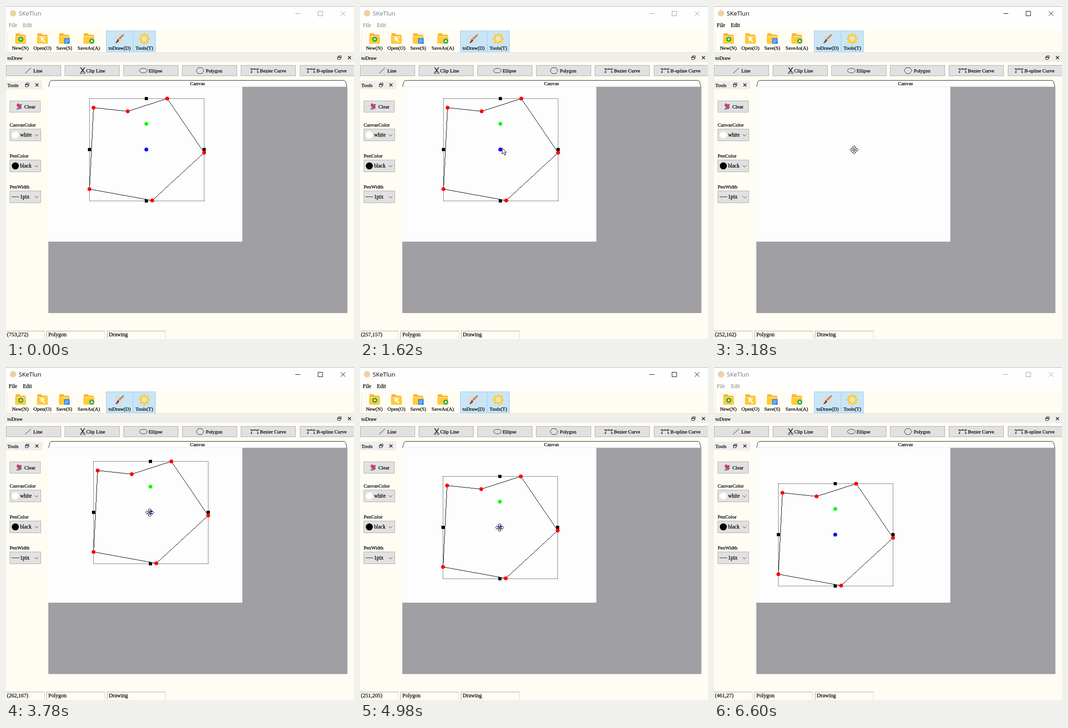
An HTML page with a canvas that plays this animation: 765x732 px, repeating every 6780 ms.

```html
<!DOCTYPE html>
<html lang="en">
<head>
<meta charset="utf-8">
<title>Polygon drag</title>
<style>
html, body { margin: 0; width: 765px; height: 732px; overflow: hidden; }
canvas { display: block; }
</style>
</head>
<body>
<canvas id="stage" width="765" height="732"></canvas>
<script>
const ctx = document.getElementById('stage').getContext('2d');
const LOOP = 6780, STEP = 60, SCALE = 0.853;
const SERIF = '"Liberation Serif", serif';

// Pointer path: time, then canvas coordinates as shown in the status bar
const path = [
  [240, 770, -199], [600, 342, 64], [900, 342, 64], [1620, 257, 157],
  [2160, 252, 161], [2460, 252, 161], [2520, 252, 162], [3480, 252, 162],
  [3780, 262, 167], [4200, 273, 183], [4380, 284, 197], [4620, 291, 205],
  [4740, 291, 205], [4980, 251, 205], [5460, 203, 224], [5820, 203, 224],
  [6000, 461, 27], [6120, 776, -164]
];
const corners = [[192, 223], [267, 231], [354, 203], [435, 322], [321, 427], [183, 402]];
const frame = [[183, 203], [435, 203], [435, 428], [183, 428]];
const handles = [[308, 203], [183, 315], [435, 315], [308, 428]];

const clamp = (v, a, b) => Math.max(a, Math.min(b, v));

function pointer(t) {
  t = clamp(t, path[0][0], path[path.length - 1][0]);
  const i = Math.max(1, path.findIndex(k => k[0] >= t));
  const [a, b] = [path[i - 1], path[i]];
  const f = (t - a[0]) / (b[0] - a[0]);
  return [1, 2].map(n => Math.round(a[n] + (b[n] - a[n]) * f));
}

function box(x, y, w, h, fill, edge) {
  ctx.fillStyle = edge || fill;
  ctx.fillRect(x, y, w, h);
  if (edge) {
    ctx.fillStyle = fill;
    ctx.fillRect(x + 1, y + 1, w - 2, h - 2);
  }
}

function text(s, x, y, size = 11.3, align = 'left', color = '#000', family = SERIF) {
  ctx.font = `${size}px ${family}`;
  ctx.textAlign = align;
  ctx.fillStyle = ctx.strokeStyle = color;
  ctx.fillText(s, x, y);
  if (family === SERIF) {
    ctx.lineWidth = 0.25;
    ctx.strokeText(s, x, y);
  }
}

function shape(d, fill, stroke, width = 1) {
  const p = new Path2D(d);
  if (fill) { ctx.fillStyle = fill; ctx.fill(p); }
  if (stroke) { ctx.strokeStyle = stroke; ctx.lineWidth = width; ctx.stroke(p); }
}

function dot(x, y, r, fill, edge, ry = r) {
  ctx.beginPath();
  ctx.ellipse(x, y, r, ry, 0, 0, 7);
  if (fill) { ctx.fillStyle = fill; ctx.fill(); }
  if (edge) { ctx.strokeStyle = edge; ctx.lineWidth = 1; ctx.stroke(); }
}

// Closed outline of whole pixels, without smoothing
function pixelLoop(points, gap) {
  ctx.fillStyle = '#000';
  points.forEach(([x, y], i) => {
    const [nx, ny] = points[(i + 1) % points.length];
    const n = Math.max(Math.abs(nx - x), Math.abs(ny - y));
    for (let k = 0; k < n; k += gap) {
      ctx.fillRect(Math.round(x + (nx - x) * k / n), Math.round(y + (ny - y) * k / n), 1, 1);
    }
  });
}

function placed(x, y, angle, draw) {
  ctx.save();
  ctx.translate(x, y);
  ctx.rotate(angle);
  draw();
  ctx.restore();
}

const cross = (x, y, r, color, width = 1) =>
  shape(`M${x - r} ${y - r}l${2 * r} ${2 * r}m0 ${-2 * r}l${-2 * r} ${2 * r}`, null, color, width);

function titleBar(t) {
  const active = t >= 3180 && t < 6540;
  const ink = active ? '#000' : '#999';
  let mark = ink;
  box(0, 0, 765, 31, '#fefefe');
  box(0, 31, 765, 22, '#fffefb');
  box(0, 0, 765, 1, '#a8a8a8');
  if (t === 240 || t === 300) {
    box(719, 1, 46, 29, t === 240 ? '#e81123' : '#f4a0a7');
    mark = '#fff';
  }
  dot(15.5, 16, 7, '#f0cfa4');
  text('SKeTlun', 28, 21, 13.2, 'left', active ? '#000' : '#777', '"Open Sans", sans-serif');
  shape('M636 16.5h11M686 11.5h10v10h-10z', null, ink);
  cross(741, 16.5, 5, mark);
  text('File', 6, 46, 12, 'left', ink);
  text('Edit', 37, 46, 12, 'left', ink);
}

function folder(x) {
  placed(x, 59, 0, () => {
    shape('M1 1H10L12 4H21Q23 4 23 6V22H1Z', '#ffb52b');
    shape('M3 7H21V12H3Z', '#ffe28a');
    shape('M0 9H24V21Q24 24 21 24H3Q0 24 0 21Z', '#ffcb3a');
  });
}

function toolBar() {
  ctx.fillStyle = '#b8b5ae';
  for (let y = 57; y < 100; y += 3) ctx.fillRect(3, y, 1, 1);
  box(220, 54, 60, 47, '#c9e5f6', '#94cdf5');
  box(279, 54, 50, 47, '#c9e5f6', '#94cdf5');
  folder(20);
  dot(32.5, 73, 5.5, '#24a83b');
  shape('M29.5 73h6M32.5 70v6', null, '#fff', 1.5);
  folder(68);
  shape('M76 67l10 4-4 2 4 5-2 2-4-5-3 3z', '#fff');
  folder(116);
  box(128, 71, 12, 12, '#2b83ea');
  shape('M130 74.5h8M130 77.5h8M130 80.5h5', null, '#fff');
  folder(170);
  dot(188.5, 77, 5.5, '#2bab46');
  shape('M188.5 73.5l3 5.5h-6z', '#fff');

  dot(248, 73, 10, '#dddcd8');
  shape('M259 62Q260 63 258 66L250 74 247 71 256 63Q258 61 259 62Z', '#c0855f');
  shape('M246 72l3 3Q247 81 240 82 243 78 246 72Z', '#6b4c3c');
  placed(304, 72, 0, () => {
    for (let i = 0; i < 8; i++) {
      ctx.rotate(Math.PI / 4);
      box(-2.5, -12, 5, 6, '#fccb3c');
    }
    dot(0, 0, 9, '#fdd04a');
    dot(0, 0, 5.5, '#fbe7a2');
    dot(0, 0, 4, '#d5e6ec');
  });
  [['New(N)', 31.5], ['Open(O)', 80], ['Save(S)', 128], ['SaveAs(A)', 182], ['toDraw(D)', 249.5], ['Tools(T)', 304]]
    .forEach(([s, x]) => text(s, x, 96, 11.1, 'center'));
}

function dockTitle(s, x, y, w, h, icons) {
  box(x, y, w, h, '#efeeea');
  text(s, 3, y + 14, 11.2);
  const [a, b] = icons, m = y + 9.5;
  shape(`M${a - 3.5} ${m - 1}h6v5h-6zM${a - 1.5} ${m - 1}v-3h6v5h-2`, null, '#222');
  shape(`M${a - 4} ${m - 1}h7`, null, '#222', 2);
  cross(b, m, 3.3, '#222', 1.6);
}

function curveIcon(x) {
  shape(`M${x} 146Q${x} 138 ${x + 7} 138.5Q${x + 14} 138 ${x + 14} 146M${x - 1} 138.5h16`, null, '#333');
  for (const [dx, y] of [[-2, 137], [5.5, 137], [13, 137], [-1.5, 144], [12.5, 144]]) {
    box(x + dx, y, 3, 3, '#fff', '#333');
  }
}

function drawBar() {
  box(0, 102, 765, 1, '#d2d0ca');
  dockTitle('toDraw', 0, 104, 765, 19, [732.5, 755]);
  const labels = [['Line', 70], ['Clip Line', 197], ['Ellipse', 328.5], ['Polygon', 457.5], ['Bezier Curve', 587], ['B-spline Curve', 715.5]];
  labels.forEach(([s, x], i) => {
    box(Math.round(i * 129.1), 130, 121, 24, '#e1e1e1', '#adadad');
    text(s, x, 146, 10.9, 'center');
  });
  shape('M42 148L55 136', null, '#222');
  shape('M164 135l7 10M173 135l-7 10', null, '#222', 1.8);
  dot(165, 147, 2, null, '#222');
  dot(172, 147, 2, null, '#222');
  dot(302, 142, 8.5, null, '#333', 5);
  shape('M422.5 135.5h8l4.5 6.5-4.5 6.5h-8l-4.5-6.5z', null, '#333');
  curveIcon(539.5);
  curveIcon(663.5);
}

function sidePanel() {
  dockTitle('Tools', 0, 164, 80, 19, [46, 68]);
  box(8, 208, 68, 26, '#e1e1e1', '#adadad');
  shape('M25 214l4 1 6 8-4 4-8-8z', '#e7354d');
  shape('M29 218l4-3 2 2-3 4z', '#4865c8');
  shape('M22 227l5-5 4 4-4 2z', '#5a8be0');
  text('Clear', 52.5, 225, 11.4, 'center');
  [['CanvasColor', 'white'], ['PenColor', 'black'], ['PenWidth', '1pix']].forEach(([label, value], i) => {
    const y = 270 + i * 68;
    text(label, 8, y - 5, 11);
    box(8, y, 69, 27, '#e1e1e1', '#adadad');
    if (i < 2) dot(20.5, y + 13.5, 7.8, i ? '#000' : '#fff');
    else box(12, y + 13, 17, 1, '#222');
    text(value, 31, y + 17, 11.5);
    shape(`M63 ${y + 12}l4 4 4-4`, null, '#444');
  });
}

function canvasArea() {
  shape('M93.5 178L96 168Q97.5 163.5 102 163.5H742Q746 163.5 747 168L749.5 178', '#fefefe', '#222');
  text('Canvas', 421, 174, 11.2, 'center');
  box(93, 177.5, 657.5, 497.5, '#a09fa4');
  box(93, 177.5, 426.5, 340.5, '#fdfdfd');
}

function polygon(t) {
  if (t === 3180) return;
  const [x, y] = pointer(clamp(t, 3480, 5460));
  placed(Math.round((x - 252) * SCALE), Math.round((y - 162) * SCALE), 0, () => {
    pixelLoop(frame, 2);
    pixelLoop(corners, 1);
    for (const [cx, cy] of handles) box(cx - 3, cy - 3, 7, 7, '#000');
    for (const [cx, cy] of corners) dot(cx + 0.5, cy + 0.5, 4.3, '#f00');
    dot(308.5, 259, 4.3, '#0f0');
    dot(308.5, 315.5, 4.3, '#00f');
  });
}

function statusBar(t) {
  const [x, y] = pointer(Math.min(t, 6000));
  const place = t < 240 || y < 0 ? '753,272' : `${x},${y}`;
  [[`(${place})`, -1, 86], ['Polygon', 89, 129], ['Drawing', 222, 129]].forEach(([s, left, w], i) => {
    box(left, 714, w, 1, '#a5a4a0');
    box(left, 714, 1, 17, '#a5a4a0');
    box(left + w - 1, 714, 1, 17, '#d6d4ce');
    text(s, i ? left + 4 : 2, 726, 12);
  });
}

function cursor(t) {
  if (t < 240 || t >= 6180) return;
  const [x, y] = pointer(t);
  placed(Math.round(93 + x * SCALE), Math.round(178 + y * SCALE), 0, () => {
    if (t < 1680 || t >= 5580) {
      shape('M.5 .5V13.5L3.5 10.7 6 16 8.4 15 6 9.7H10Z', '#fff', '#000');
      return;
    }
    let d = '';
    for (let i = 0; i < 4; i++) {
      const c = [1, 0, -1, 0][i], s = [0, 1, 0, -1][i];
      for (const [px, py] of [[-1.5, -1.5], [-1.5, -5.5], [-4, -5.5], [0, -9.3], [4, -5.5], [1.5, -5.5]]) {
        d += `${d ? 'L' : 'M'}${px * c - py * s} ${px * s + py * c}`;
      }
    }
    shape(d + 'Z', '#fff', '#111');
    // The centre dot shows through the shaft while dragging
    const dragging = t >= 3240;
    box(-1, -1, 2, 2, dragging ? '#00f' : '#111');
    if (dragging) shape('M-3.5 0h7M0 -3.5v7', null, '#22c');
  });
}

function render(now) {
  const t = Math.floor(now % LOOP / STEP) * STEP;
  box(0, 0, 765, 732, '#fffcf3');
  titleBar(t);
  toolBar();
  drawBar();
  sidePanel();
  canvasArea();
  polygon(t);
  statusBar(t);
  cursor(t);
}

const start = performance.now();
function tick() {
  render(performance.now() - start);
  requestAnimationFrame(tick);
}
tick();
</script>
</body>
</html>
```
